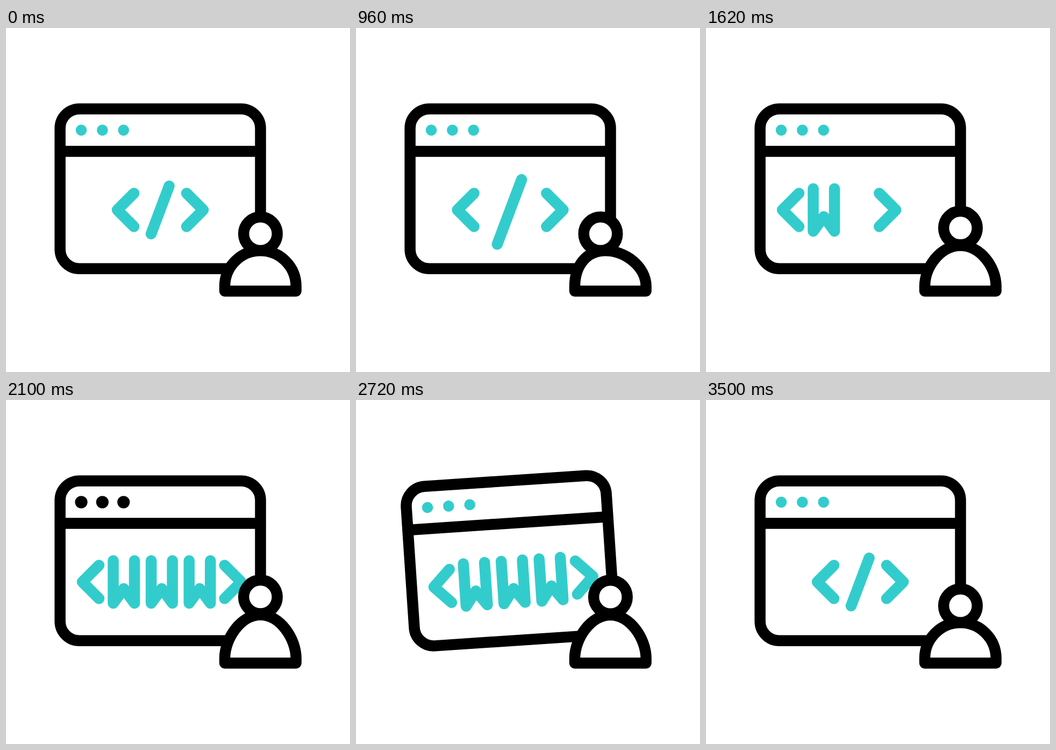
Animation of 640x640 px, one loop 3600 ms. Source, as an HTML page without scripts:

```html
<!DOCTYPE html>
<html lang="en">
<head>
<meta charset="utf-8">
<title>Web developer icon</title>
<style>
  /* swing and rock oscillate from 0 to 1; the others switch them on per phase */
  @property --swing { syntax: "<number>"; inherits: true; initial-value: 0; }
  @property --rock { syntax: "<number>"; inherits: true; initial-value: 0; }
  @property --lean { syntax: "<number>"; inherits: true; initial-value: 0; }
  @property --stretch { syntax: "<number>"; inherits: true; initial-value: 0; }
  @property --tilt { syntax: "<number>"; inherits: true; initial-value: 0; }
  @property --typed { syntax: "<number>"; inherits: true; initial-value: 0; }

  html, body { margin: 0; width: 100%; height: 100%; overflow: hidden; background: #fff; }

  svg {
    --loop: 3600ms;
    --sine: cubic-bezier(.37, 0, .63, 1);
    display: block;
    width: 100vw;
    height: 100vh;
    animation:
      swing 300ms var(--sine) infinite alternate,
      rock calc(var(--loop) / 44) var(--sine) 11ms infinite alternate,
      phases var(--loop) step-end infinite,
      typing var(--loop) infinite;
  }
  @keyframes swing { to { --swing: 1; } }
  @keyframes rock { to { --rock: 1; } }
  @keyframes phases {
    0% { --lean: 1; }
    33.333% { --lean: 0; --stretch: 1; }
    59.4% { --tilt: 1; }
    83.333% { --stretch: 0; }
    95.76% { --tilt: 0; }
  }
  @keyframes typing {
    0%, 33.333% { --typed: 0; animation-timing-function: steps(3); }
    54.167%, 86.667% { --typed: 3; animation-timing-function: steps(3); }
    95%, 100% { --typed: 0; }
  }

  .line { fill: none; stroke: #000; stroke-width: 20.5; stroke-linecap: round; stroke-linejoin: round; }
  .solid { fill: #fff; }
  .code { stroke: #3cc; }

  .window {
    transform-origin: 287px 299px;
    transform: rotate(calc(var(--rock) * var(--tilt) * -3.95deg));
  }

  .dots circle { fill: #3cc; r: 10.3px; animation: blink 600ms step-end 10ms infinite; }
  @keyframes blink {
    from { fill: #000; r: 11.6px; }
    50% { fill: #3cc; r: 10.3px; }
  }

  /* The tag breathes by transform, and opens for the letters by translate and scale */
  .left, .right, .slash { --breath: calc(var(--swing) * var(--lean)); animation: var(--loop) var(--sine) infinite; }
  .left { transform: translateX(calc(var(--breath) * -20.4px)); animation-name: left; }
  .right { transform: translateX(calc(var(--breath) * 20.4px)); animation-name: right; }
  .slash {
    vector-effect: non-scaling-stroke;
    transform-origin: 286.8px 338.5px;
    transform: translate(calc(var(--breath) * -1.5px), calc(var(--breath) * 4px)) scale(calc(1 + var(--breath) * .39));
    animation-name: slash;
  }
  @keyframes left {
    33.333%, 96.667% { translate: 0; }
    38.889%, 92.222% { translate: -65px; }
  }
  @keyframes right {
    33.333%, 96.667% { translate: 0; }
    38.889% { translate: -85px; animation-timing-function: linear; }
    45% { translate: -14px; animation-timing-function: ease-out; }
    59.444%, 88.333% { translate: 71.5px; }
  }
  @keyframes slash {
    33.333%, 96.667% { scale: 1; opacity: 1; }
    38% { scale: .01; opacity: 1; }
    38.1%, 94.4% { scale: .01; opacity: 0; }
    94.5% { scale: .01; opacity: 1; }
  }
  .letter { opacity: calc(var(--typed) - var(--index)); }

  .head {
    transform: translate(calc(var(--swing) * var(--lean) * -20.4px), calc(var(--swing) * var(--stretch) * -16.5px));
  }
  .body { animation: 300ms var(--sine) infinite alternate; }
  .leaning { opacity: var(--lean); animation-name: lean; }
  .stretching { opacity: var(--stretch); animation-name: stretch; }
  .resting { opacity: calc(1 - var(--lean) - var(--stretch)); }
  .body { d: path("M407 489.4V480.6C407 444 436.7 414.3 473.4 414.3C510 414.3 539.6 444 539.6 480.6V489.4Z"); }
  @keyframes lean {
    to { d: path("M407 489.4V480.6C407 444 426.2 414.3 462.9 414.3C499.5 414.3 539.6 444 539.6 480.6V489.4Z"); }
  }
  @keyframes stretch {
    to { d: path("M407 489.4V480.6C407 444 436.7 399.8 473.4 399.8C510 399.8 539.6 444 539.6 480.6V489.4Z"); }
  }
</style>
</head>
<body>
<svg viewBox="0 0 640 640">
  <defs>
    <path id="w" d="M199.5 299V378L219.2 351L239 378V299"/>
  </defs>
  <g class="window">
    <rect class="line" x="100.6" y="150.4" width="372.9" height="297.3" rx="36"/>
    <path class="line" d="M101 229.4H473"/>
    <g class="dots">
      <circle cx="140" cy="190"/>
      <circle cx="179.3" cy="190"/>
      <circle cx="218.7" cy="190"/>
    </g>
    <g class="line code">
      <path class="slash" d="M303.5 294L270 383"/>
      <use class="letter" style="--index: 0" href="#w"/>
      <use class="letter" style="--index: 1" href="#w" x="70.6"/>
      <use class="letter" style="--index: 2" href="#w" x="141.2"/>
      <path class="left" d="M238 307.4L207 338.4L238 369.4"/>
      <path class="right" d="M336 307.4L367 338.4L336 369.4"/>
    </g>
  </g>
  <circle class="line solid head" cx="473.4" cy="382.8" r="31.3"/>
  <path class="line solid body leaning"/>
  <path class="line solid body stretching"/>
  <path class="line solid body resting"/>
</svg>
</body>
</html>
```
